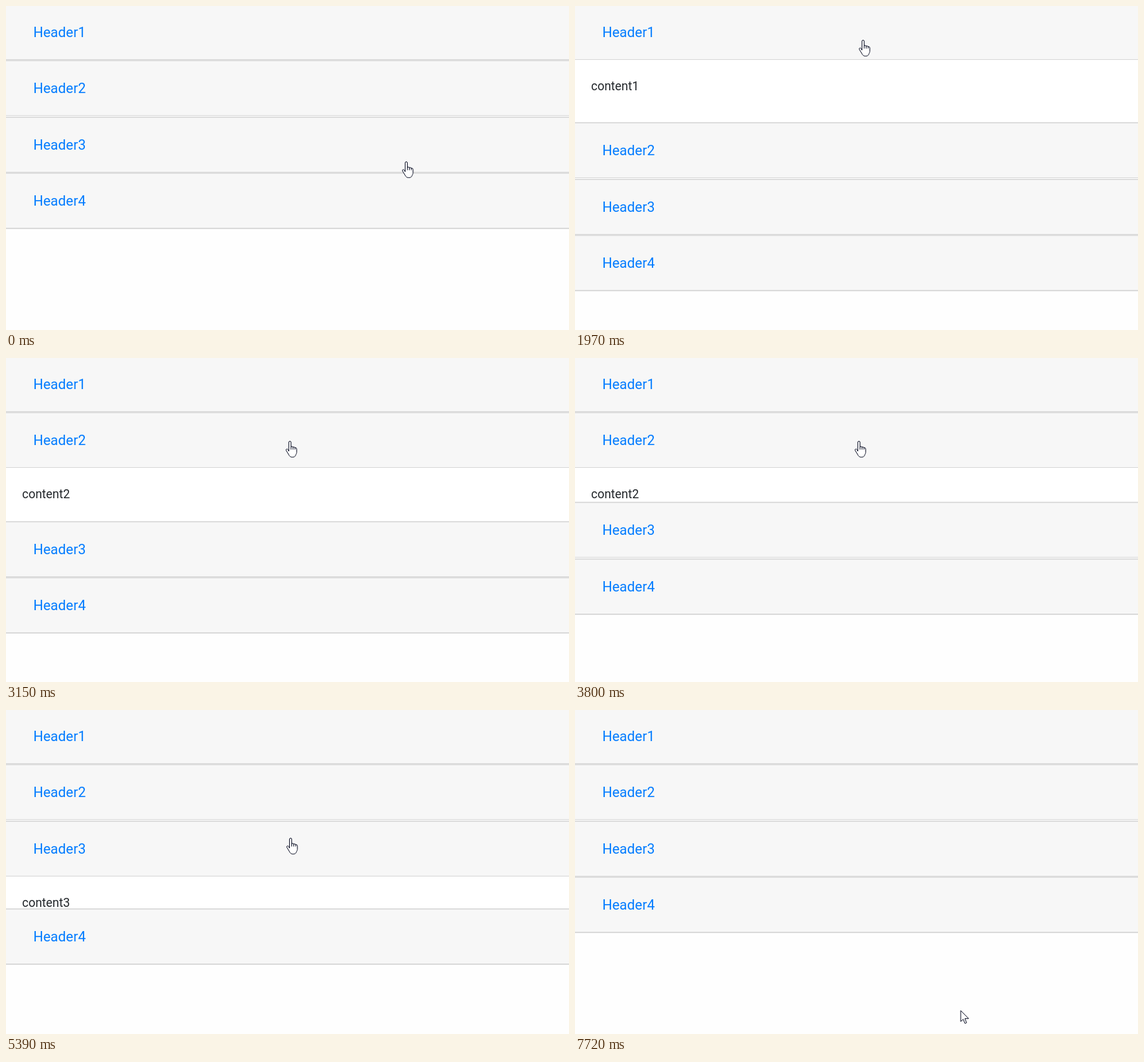
Write an HTML page that moves like this. It is 813 px wide and 469 px high and loops after 7870 ms.

```html
<!DOCTYPE html>
<html lang="en">
<head>
<meta charset="utf-8">
<title>Accordion</title>
<style>
  html, body { margin: 0; width: 100%; height: 100%; overflow: hidden; background: #fefefe; }
  svg { display: block; width: 813px; height: 469px; }
  text { font-family: Roboto, sans-serif; }
  .title { font-size: 20px; fill: #007bff; }
  .content { font-size: 17.5px; fill: #212529; }
  .cursor { fill: #fff; stroke: #11152a; stroke-linejoin: round; stroke-linecap: round; }
</style>
</head>
<body>
<svg id="stage" viewBox="0 0 813 469">
  <rect width="813" height="469" fill="#fefefe"/>
  <g id="cards"></g>
  <g id="hand" class="cursor">
    <path d="M-1.6 14.5V2.1a1.6 1.6 0 0 1 3.2 0v6.3q1.6-1 2.8.6q1.8-.8 2.8.8q2.4-.5 2.6 2v4.5c0 2-1 2.6-1.4 4.2-.6 2-2.4 3-4.8 3-3.4 0-4.2-1.6-5.2-3.4l-3.8-6.3c-.9-1.6.9-2.8 2.2-1.6z"/>
    <path d="M1.6 8.4v3.8M4.4 9v3.2M7.2 9.8v2.4" fill="none"/>
  </g>
  <path id="arrow" class="cursor" d="M0 .5V16l3.6-3.4 2.5 6.1 2.4-1L6 11.7h5z"/>
</svg>
<script>
const LOOP = 7870, WIDTH = 813, PITCH = 244 / 3, HEADER_END = 77;
const OPEN_HEIGHT = 90, COLLAPSE_MS = 350;

// Start times of opening and closing for each panel
const toggles = [[1149.5, 2081], [2960, 3705], [4579, 5290], [6300, 7140]];

// Pointer tip: time, x, y
const path = [
  [150, 578, 225], [880, 416, 49], [2110, 416, 49], [2425, 411.5, 120],
  [2580, 410, 120], [3900, 410, 120], [4230, 411, 185], [5480, 411, 185],
  [5920, 407, 254], [6090, 406, 266], [7270, 406, 266], [7720, 557, 435]
];

const byId = id => document.getElementById(id);
const clamp = v => Math.min(1, Math.max(0, v));
const smooth = u => u * u * (3 - 2 * u);

function add(parent, tag, attrs, label) {
  const el = document.createElementNS("http://www.w3.org/2000/svg", tag);
  for (const key in attrs) el.setAttribute(key, attrs[key]);
  if (label) el.textContent = label;
  parent.appendChild(el);
  return el;
}

// CSS "ease": cubic-bezier(.25, .1, .25, 1)
function ease(x) {
  if (x <= 0 || x >= 1) return clamp(x);
  const curve = (a, b, s) => 3 * a * s * (1 - s) ** 2 + 3 * b * s * s * (1 - s) + s ** 3;
  let lo = 0, hi = 1;
  for (let i = 0; i < 24; i++) {
    const mid = (lo + hi) / 2;
    if (curve(.25, .25, mid) < x) lo = mid; else hi = mid;
  }
  return curve(.1, 1, lo);
}

const cards = toggles.map((_, i) => {
  const g = byId("cards");
  const bar = fill => add(g, "rect", { width: WIDTH, height: 1, fill });
  const body = bar("#fff");
  const content = add(g, "text", { class: "content", x: 23.25 }, "content" + (i + 1));
  // Hides the part of the content below the collapsing edge
  const below = bar("#fefefe");
  return {
    body, content, below,
    header: bar("#f7f7f7"), top: bar("#dedede"),
    rule: bar("#d8d8d8"), bottom: bar("#dedede"),
    title: add(g, "text", { class: "title", x: 39.5 }, "Header" + (i + 1))
  };
});

function panelHeight([open, close], t) {
  return OPEN_HEIGHT * (ease((t - open) / COLLAPSE_MS) - ease((t - close) / COLLAPSE_MS));
}

function pointerAt(t) {
  const next = path.findIndex(p => p[0] > t);
  if (next === 0) return path[0].slice(1);
  if (next < 0) return path[path.length - 1].slice(1);
  const [t0, x0, y0] = path[next - 1], [t1, x1, y1] = path[next];
  const u = smooth((t - t0) / (t1 - t0));
  return [x0 + (x1 - x0) * u, y0 + (y1 - y0) * u];
}

function place(el, y, height) {
  el.setAttribute("y", y);
  if (height !== undefined) el.setAttribute("height", Math.max(0, height));
}

function render(t) {
  const [px, py] = pointerAt(t);
  let shift = 0, overHeader = false;
  cards.forEach((card, i) => {
    const line = HEADER_END + PITCH * i + shift;
    const rule = Math.round(line);
    const height = panelHeight(toggles[i], t);
    const top = Math.round(line + 2.4 - PITCH);
    const bottom = Math.round(line + 1.4 + height);
    place(card.top, top);
    place(card.header, top + 1, rule - top - 1);
    place(card.title, Math.round(line - 32));
    place(card.rule, rule);
    place(card.body, rule + 1, bottom - rule - 1);
    place(card.content, rule + 45);
    card.content.setAttribute("visibility", height > 0 ? "visible" : "hidden");
    place(card.below, bottom, 469 - bottom);
    place(card.bottom, bottom);
    if (py >= top - 2 && py <= rule + 1) overHeader = true;
    shift += height;
  });
  const at = `translate(${Math.round(px)} ${Math.round(py)})`;
  for (const [id, on] of [["hand", overHeader], ["arrow", !overHeader]]) {
    byId(id).setAttribute("transform", at);
    byId(id).setAttribute("visibility", on ? "visible" : "hidden");
  }
}

const start = performance.now();
function tick() {
  render((performance.now() - start) % LOOP);
  requestAnimationFrame(tick);
}
tick();
</script>
</body>
</html>
```
